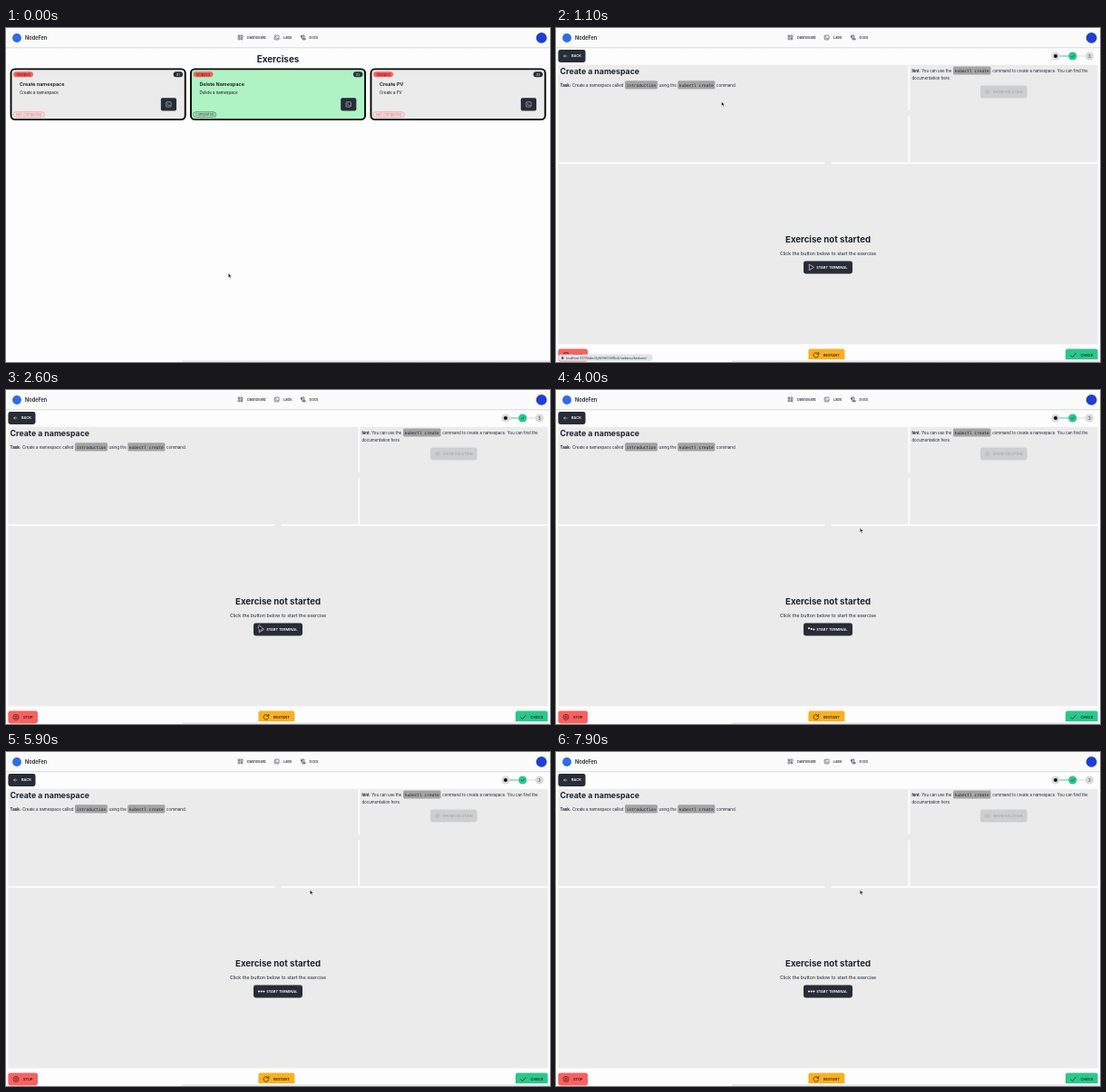
These frames come from a looping animation (600 by 369 pixels, 8000 ms). An HTML page:

```html
<!DOCTYPE html>
<html lang="en">
<head>
<meta charset="utf-8">
<title>Exercises</title>
<style>
html, body { margin: 0; width: 100%; height: 100%; overflow: hidden; background: #fdfdfd; }
svg { display: block; width: 600px; height: 369px; font-family: Inter, "Open Sans", sans-serif; }
text { white-space: pre; }
.mono { font-family: "DejaVu Sans Mono", monospace; }
</style>
</head>
<body>
<svg id="stage" viewBox="0 0 600 369" xmlns="http://www.w3.org/2000/svg">
  <defs>
    <linearGradient id="edge" x1="0" y1="0" x2="0" y2="1">
      <stop offset="0" stop-color="#fdfdfd"/><stop offset="1" stop-color="#dedede"/>
    </linearGradient>
    <linearGradient id="shade" x1="0" y1="0" x2="0" y2="1">
      <stop offset="0" stop-color="#d6d6d8"/><stop offset="1" stop-color="#fdfdfd"/>
    </linearGradient>
  </defs>
</svg>
<script>
const INK = '#1c2230', DARK = '#272c37', PANEL = '#ebebeb', RED = '#f76161',
      GREEN = '#2cc68c', AMBER = '#f8b022', WHITE = '#fff';
const LOOP = 8000, STEP = 100;
const stage = document.getElementById('stage');

function el(parent, tag, attrs, text) {
  const node = document.createElementNS('http://www.w3.org/2000/svg', tag);
  for (const key in attrs) node.setAttribute(key, attrs[key]);
  if (text) node.textContent = text;
  parent.append(node);
  return node;
}
const group = parent => el(parent, 'g', {});
const box = (g, x, y, x2, y2, fill, r = 0, more = {}) =>
  el(g, 'rect', { x, y, width: x2 - x, height: y2 - y, rx: r, fill, ...more });
const dot = (g, cx, cy, r, fill) => el(g, 'circle', { cx, cy, r, fill });
const label = (g, x, y, size, text, more = {}) =>
  el(g, 'text', { x, y, 'font-size': size, fill: INK, ...more }, text);
const line = (g, d, stroke = INK, width = 0.6) =>
  el(g, 'path', { d, stroke, 'stroke-width': width, fill: 'none', 'stroke-linecap': 'round', 'stroke-linejoin': 'round' });
const BOLD = { 'font-weight': 700 }, SEMI = { 'font-weight': 600 }, MID = { 'text-anchor': 'middle' };

function terminalIcon(g, x, y, color, s = 5.4) {
  box(g, x, y, x + s, y + s, 'none', 0.8, { stroke: color, 'stroke-width': 0.55 });
  line(g, `M${x + s * .25} ${y + s * .3}l${s * .2} ${s * .18}l${-s * .2} ${s * .18}M${x + s * .55} ${y + s * .7}h${s * .22}`, color, 0.5);
}

function header(g) {
  box(g, 0, 0, 600, 21.5, '#fbfbfb');
  box(g, 0, 21.2, 600, 23, 'url(#shade)');
  dot(g, 12, 11, 4.9, '#326ce5');
  label(g, 21, 13.1, 5.6, 'NodeFen', SEMI);
  const nav = { 'font-weight': 500 };
  for (const [x, y, h] of [[256, 8, 1.6], [256, 10.8, 2], [259, 8, 2.4], [259, 11.6, 1.2]])
    box(g, x, y, x + 1.9, y + h, 'none', 0.2, { stroke: INK, 'stroke-width': 0.55 });
  label(g, 266, 12, 3.95, 'Dashboard', nav);
  terminalIcon(g, 296.2, 8.1, INK, 4.8);
  label(g, 306, 12, 3.95, 'Labs', nav);
  line(g, 'M325.4 9.9v-1q0 -.8 .8 -.8h2.6v3.6M325.4 9.9h1.4v2.2q0 .8 .8 .8h2q.8 0 .8 -1h-2.8M326.8 9.9v-1');
  label(g, 334.6, 12, 3.95, 'Docs', nav);
  dot(g, 590.6, 10.9, 5.9, '#1f3fd0');
}

function card(g, x, num, title, desc, done) {
  box(g, x + .9, 45.4, x + 193.1, 101.1, done ? '#aff3c5' : PANEL, 4.4, { stroke: '#050505', 'stroke-width': 1.9 });
  box(g, x + 3.6, 48.2, x + 25.4, 54.2, RED, 3);
  label(g, x + 14.5, 52.6, 3.85, 'Stopped', { ...MID, fill: '#4a1616' });
  box(g, x + 180, 48.2, x + 190.4, 54.2, DARK, 3);
  label(g, x + 185.2, 52.6, 3.8, '#' + num, { ...MID, fill: '#d6d9de' });
  label(g, x + 10.4, 64, 5.45, title, { ...SEMI, fill: '#111' });
  label(g, x + 10.4, 73.4, 4.4, desc, { fill: '#111' });
  const button = box(g, x + 166.2, 77.2, x + 183.4, 91.5, DARK, 2);
  terminalIcon(g, x + 172.1, 81.7, '#d6d9de');
  const tint = done ? '#1d2b25' : '#f2605f', right = x + (done ? 28.6 : 37.8);
  box(g, x + 3.6, 92.8, right, 98.4, 'none', 2.8, { stroke: tint, 'stroke-width': 0.5 });
  label(g, (x + 3.6 + right) / 2, 97.1, 4, done ? 'Completed' : 'Not Completed', { ...MID, fill: tint });
  return button;
}

function button(g, x, y, x2, fill, textX, text, ink, more = {}) {
  box(g, x, y, x2, y + 14, fill, 2.4);
  label(g, textX, y + 8.4, 3.95, text, { ...SEMI, fill: ink, ...more });
}

function code(g, x, x2, y, text) {
  box(g, x, y - 6.3, x2, y + 2.9, '#a4a4a4', 1.5);
  label(g, (x + x2) / 2, y, 4.5, text, { ...MID, class: 'mono' });
}

function listPage(g) {
  label(g, 300, 38, 9.9, 'Exercises', { ...BOLD, ...MID });
  const first = card(g, 4.6, 1, 'Create namespace', 'Create a namespace', false);
  card(g, 203, 2, 'Delete Namespace', 'Delete a namespace', true);
  card(g, 401.6, 3, 'Create PV', 'Create a PV', false);
  const tip = group(g);
  box(tip, 164.8, 68.2, 194.4, 76, DARK, 1.3);
  el(tip, 'path', { d: 'M178 76h3.4l-1.7 1.6z', fill: DARK });
  label(tip, 179.6, 73.5, 3.8, 'open console', { ...MID, fill: '#f0f1f3' });
  return { first, tip };
}

function labPage(g) {
  button(g, 2.4, 24, 32.5, DARK, 17, 'BACK', WHITE);
  line(g, 'M12 31h-3.4M10 29.6l-1.4 1.4l1.4 1.4', WHITE, 0.5);

  line(g, 'M551 31H570', GREEN, 0.9);
  line(g, 'M570 31H588', '#d5d6d8', 0.9);
  dot(g, 551, 31, 4.6, '#d9dadc');
  dot(g, 551, 31, 2, '#111');
  dot(g, 569.8, 31, 4.6, GREEN);
  line(g, 'M568.3 31.2l1.1 1.1l2 -2.5', INK, 0.6);
  dot(g, 588.4, 31, 4.6, '#d9dadc');
  label(g, 588.4, 32.5, 4.2, '3', MID);

  box(g, 2.4, 40.7, 597.6, 349.4, PANEL);
  for (const [x, y, x2, y2] of [[388.4, 40.7, 390.2, 91], [388.4, 97.5, 390.2, 149], [2, 148.4, 296.5, 150.2], [303.5, 148.4, 598, 150.2]])
    box(g, x, y, x2, y2, '#fdfdfd');

  label(g, 4.6, 51.4, 8.75, 'Create a namespace', BOLD);
  label(g, 4.6, 64.5, 4.4, 'Task:', BOLD);
  label(g, 18, 64.5, 4.4, 'Create a namespace called');
  code(g, 76, 112, 64.5, 'introduction');
  label(g, 113.6, 64.5, 4.4, 'using the');
  code(g, 134.2, 175.4, 64.5, 'kubectl create');
  label(g, 177, 64.5, 4.4, 'command.');

  const hint = label(g, 392.4, 48.7, 4.4, '');
  el(hint, 'tspan', BOLD, 'hint');
  el(hint, 'tspan', {}, ': You can use the');
  code(g, 438, 479.6, 48.7, 'kubectl create');
  label(g, 481.2, 48.7, 4.4, 'command to create a namespace. You can find the');
  label(g, 392.4, 57.2, 4.4, 'documentation here.');
  button(g, 468, 63.6, 519.6, '#cdced0', 482, 'SHOW SOLUTION', '#a6a8ad', { 'font-size': 3.8 });
  line(g, 'M473.2 70.5q2.8 -4 5.6 0q-2.8 4 -5.6 0M475.2 70.5h1.6', '#a6a8ad', 0.55);

  label(g, 300, 237.3, 9.65, 'Exercise not started', { ...BOLD, ...MID });
  label(g, 300, 250.6, 5.25, 'Click the button below to start the exercise', MID);
  button(g, 273, 257.5, 327, DARK, 287.2, 'START TERMINAL', WHITE);
  const play = line(g, 'M279.3 261.5v6.2l4.8 -3.1z', WHITE, 0.6);
  const dots = group(g);
  const balls = [279, 281.7, 284.4].map(x => dot(dots, x, 264.5, 1, WHITE));

  button(g, 2.4, 354.4, 35, RED, 19, 'STOP', '#3a1111');
  el(g, 'circle', { cx: 11, cy: 361.4, r: 3, fill: 'none', stroke: '#3a1111', 'stroke-width': 0.65 });
  box(g, 9.9, 360.3, 12.1, 362.5, 'none', 0.2, { stroke: '#3a1111', 'stroke-width': 0.6 });
  button(g, 278.4, 354.4, 318.4, AMBER, 295, 'RESTART', '#33240a');
  line(g, 'M289.3 360a2.8 2.8 0 1 0 .3 2M289.7 358.3v2h-2', '#33240a', 0.7);
  button(g, 562, 354.4, 597.6, GREEN, 578.6, 'CHECK', '#0b2e20');
  line(g, 'M567.6 361.7l2 1.9l3.7 -4.2', '#0b2e20', 0.7);
  return { play, dots, balls };
}

function statusBar(g) {
  box(g, 2.2, 360.8, 106.4, 367.8, '#dfe5e9', 3.5, { stroke: '#c9cfd3', 'stroke-width': 0.3 });
  box(g, 6, 363.8, 8.4, 365.8, '#444', 0.3);
  line(g, 'M6.5 363.8v-.7q.7 -1 1.4 0v.7', '#444', 0.4);
  label(g, 10.8, 365.5, 3.45, 'localhost:5173/labs/3y6r9rf00t08x4r/uebwou/bedoms/', { fill: '#333' });
}

const list = group(stage), lab = group(stage);
const { first, tip } = listPage(list);
const { play, dots, balls } = labPage(lab);
box(stage, 194, 366.2, 600, 369, 'url(#edge)');
header(stage);
const status = group(stage);
statusBar(status);
const pointer = group(stage);
const outline = { fill: '#0a0a0a', stroke: WHITE, 'stroke-width': 0.45, 'stroke-linejoin': 'round' };
const arrow = el(pointer, 'path', { d: 'M0 0v4.7l1.1 -1l.8 1.8l.9 -.4l-.8 -1.7h1.5z', ...outline });
const hand = el(pointer, 'path', { d: 'M-.5 .3q.5 -.6 1 0v1.7l2 .5q.6 .2 .5 .8l-.5 2.2h-2.6l-1.6 -2q.1 -.7 .8 -.4l.4 .4z', ...outline });

// time, x, y
const path = [[0, 245.3, 271], [900, 182.6, 81.4], [1150, 182.6, 81.4], [2300, 279.4, 259.4], [2850, 279.4, 259.4], [3600, 335.3, 152.6], [LOOP, 335.3, 152.6]];
const ease = p => p * p * (3 - 2 * p);

function pointAt(t) {
  let i = 1;
  while (path[i][0] < t) i++;
  const [t0, x0, y0] = path[i - 1], [t1, x1, y1] = path[i];
  const p = ease((t - t0) / (t1 - t0));
  return [x0 + (x1 - x0) * p, y0 + (y1 - y0) * p];
}

// 300 ms up, 300 ms down, 100 ms stagger, 250 ms rest
function bounce(t, i) {
  const p = ((t - 2820) % 1050 - i * 100) / 600;
  return p > 0 && p < 1 ? 1 - (2 * p - 1) ** 2 : 0;
}

const show = (node, on) => node.setAttribute('visibility', on ? 'inherit' : 'hidden');

function draw(t) {
  const onList = t < 1100, hover = t >= 800 && onList;
  const loading = t >= 2800, overLink = hover || (t >= 2200 && t < 3000);
  show(list, onList);
  show(lab, !onList);
  show(tip, hover);
  first.setAttribute('fill', hover ? '#14171d' : DARK);
  show(status, t >= 800 && t < 1900);
  show(play, !loading);
  show(dots, loading);
  if (loading) balls.forEach((ball, i) => ball.setAttribute('cy', 264.5 - 2 * bounce(t, i)));
  show(arrow, !overLink);
  show(hand, overLink);
  pointer.setAttribute('transform', `translate(${pointAt(t)})`);
}

const start = performance.now();
function tick() {
  const t = (performance.now() - start) % LOOP;
  draw(Math.floor(t / STEP) * STEP);
  requestAnimationFrame(tick);
}
tick();
</script>
</body>
</html>
```
